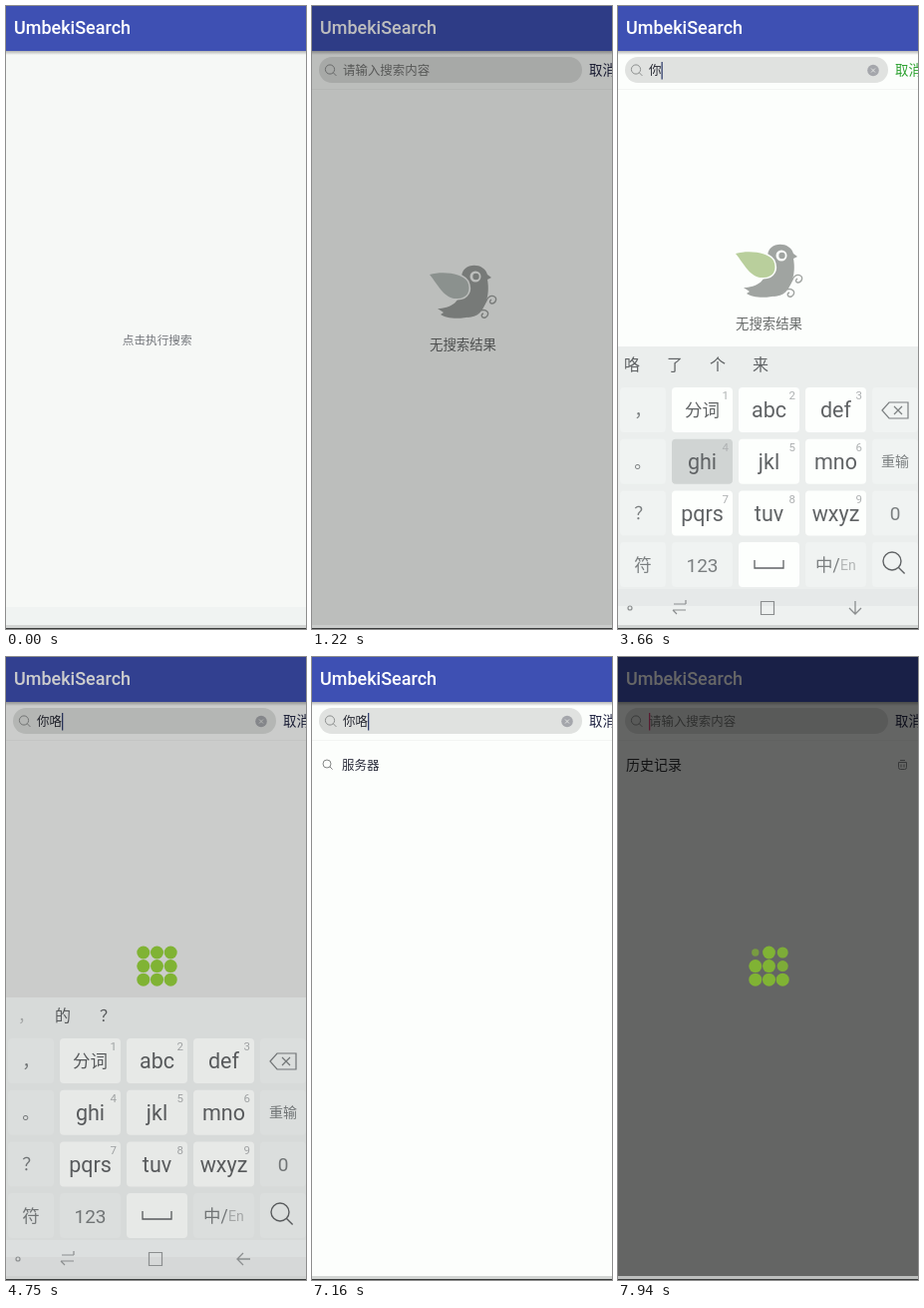
Animation, 301 px wide and 624 px high, one loop 8 s. Source, as an HTML page with a canvas:

```html
<!DOCTYPE html>
<html lang="zh-CN">
<head>
<meta charset="utf-8">
<style>
  html, body { margin: 0; width: 100%; height: 100%; overflow: hidden; background: #fcfefc; }
  canvas { display: block; }
</style>
</head>
<body>
<canvas id="stage" width="301" height="624"></canvas>
<script>
const c = document.getElementById('stage').getContext('2d');
const LOOP = 8000;

// The screen refreshes in bursts: [first, last, count] in ms.
const bursts = [
  [0, 0, 1], [210, 1010, 11], [1220, 1220, 1], [1350, 1450, 2], [1910, 1910, 1], [2370, 2370, 1],
  [2520, 2720, 3], [2790, 3300, 7], [3390, 3490, 2], [3660, 4050, 6], [4410, 4580, 3], [4750, 4750, 1],
  [4860, 5150, 4], [5360, 5360, 1], [5500, 5530, 2], [5670, 5750, 2], [6020, 6380, 6], [6680, 6760, 2],
  [7160, 7160, 1], [7390, 7800, 6], [7940, 7940, 1]
];
const ticks = bursts.flatMap(([a, b, n]) =>
  Array.from({ length: n }, (_, i) => n > 1 ? a + (b - a) * i / (n - 1) : a));

function track(t, ...points) {
  if (t <= points[0][0]) return points[0][1];
  for (let i = 1; i < points.length; i++) {
    const [a, u] = points[i - 1], [b, v] = points[i];
    if (t <= b) return u + (v - u) * (t - a) / (b - a);
  }
  return points[points.length - 1][1];
}
const within = (t, a, b) => t >= a && t < b;

function rect(x, y, w, h, color, r = 0) {
  c.fillStyle = color;
  c.beginPath();
  c.roundRect(x, y, w, h, r);
  c.fill();
}
function disc(x, y, r, color) {
  c.fillStyle = color;
  c.beginPath();
  c.arc(x, y, r, 0, 7);
  c.fill();
}
function line(d, color, width = 1) {
  c.strokeStyle = color;
  c.lineWidth = width;
  c.stroke(new Path2D(d));
}
function fill(d, color) {
  c.fillStyle = color;
  c.fill(new Path2D(d));
}
// y is the optical middle of the line
function text(s, x, y, size, color, weight = 400, align = 'left') {
  c.font = `${weight} ${size}px Roboto, "Noto Sans CJK SC", "Noto Sans CJK", sans-serif`;
  c.textAlign = align;
  c.fillStyle = color;
  c.fillText(s, x, y + size * .37);
}
function group(x, y, alpha, draw) {
  c.save();
  c.translate(x, y);
  c.globalAlpha *= alpha;
  draw();
  c.restore();
}
function magnifier(x, y, r, color, width = 1) {
  const k = r * .7;
  line(`M${x + r} ${y}A${r} ${r} 0 1 1 ${x - r} ${y}A${r} ${r} 0 1 1 ${x + r} ${y}M${x + k} ${y + k}l${k} ${k}`, color, width);
}

function header() {
  const shadow = c.createLinearGradient(0, 45, 0, 49);
  shadow.addColorStop(0, 'rgba(0,0,0,.28)');
  shadow.addColorStop(1, 'rgba(0,0,0,0)');
  rect(0, 45, 301, 4, shadow);
  rect(0, 0, 301, 45, '#3e50b3');
  text('UmbekiSearch', 8, 21.3, 18, '#fff', 500);
}

function bird(x, y, wing) {
  group(x, y, 1, () => {
    const grey = '#a0a4a1';
    fill('M32 13C31-4 55-4 58 9L62 12L58 14C61 30 56 46 42 51C30 54 16 53 11 49L14 47L8 43C20 43 34 38 32 13', grey);
    line('M38 51C52 51 53 41 57 35C61 27 69 31 66 36C63 40 58 37 62 34M49 46C57 42 62 48 56 52C52 53 51 49 54 48', grey, 1.4);
    const leaf = 'M0 9C14 5 33 8 38 16C42 25 38 33 28 33C15 34 9 20 0 9';
    line(leaf, '#fcfefc', 3);
    fill(leaf, wing);
    disc(46, 11, 5.5, '#fcfefc');
    disc(46.5, 11, 3.2, grey);
  });
}

function searchPage(t) {
  rect(0, 45, 301, 579, '#fcfefc');
  rect(0, 83, 301, 1, '#f3f5f3');
  rect(7, 51, 264, 26, '#e0e2e0', 13);
  magnifier(18, 63.5, 4.6, '#8d908f');
  const typed = t < 3660 || t >= 7390 ? '' : t < 4410 ? '你' : '你咯';
  text(typed || '请输入搜索内容', 31, 64.5, 12.45, typed ? '#23252f' : '#747674');
  if (typed) {
    disc(256, 64.5, 5.8, '#a4a6ab');
    line('M254 62.5l4 4m0-4l-4 4', '#e0e2e0');
  }
  const caretOn = within(t, 1910, 2370) || within(t, 3390, 6680) || t >= 7160;
  if (caretOn) rect(31 + typed.length * 12.5, 56, 1.3, 17.5, typed ? '#33406f' : '#e0457c');
  text('取消', 278, 64.5, 13.4, within(t, 1910, 4580) ? '#2aa02e' : '#1d2140', 500);

  if (t < 1220 || t >= 7390) {
    text('历史记录', 8, 108, 14, '#2c2e30', 500);
    line('M281.5 105.5h8v5q0 2-2 2h-4q-2 0-2-2zM283 103.5h5M284 107.5v3M287 107.5v3', '#8b8d8e');
  } else if (t < 4410) {
    const y = t < 2370 ? 260 : 239;
    bird(118, y, t < 1910 ? '#bac3be' : '#b9cf9c');
    text('无搜索结果', 151.5, y + 79, 13.4, '#666968', 400, 'center');
  } else if (t >= 6020) {
    magnifier(15, 107, 4, '#858887');
    text('服务器', 30, 108.5, 12.5, '#2b2d3c');
  }
}

const keys = [
  ['，', '分词', 'abc', 'def', ''],
  ['。', 'ghi', 'jkl', 'mno', '重输'],
  ['？', 'pqrs', 'tuv', 'wxyz', '0'],
  ['符', '123', '', '', '']
];
const columns = [[2, 46], [54, 61], [121, 61], [188, 61], [255, 46]];
const presses = [[3390, 3490, 8], [3660, 3740, 6], [3810, 3890, 7], [3960, 4050, 8], [4410, 4580, 19]];

function candidates(t) {
  const y = 359, ink = '#5f6264';
  if (t < 3390) {
    text('+', 15, y, 16, ink, 400, 'center');
    line(`M66 ${y}a8 8 0 1 1-16 0a8 8 0 1 1 16 0M54 ${y + 2}q4 4 8 0M55 ${y - 3}v1M61 ${y - 3}v1`
      + `M100 ${y - 6}h17v12h-17zM103 ${y - 2}h11M103 ${y + 2}h11`
      + `M152 ${y - 5}h9v7h-9zM158 ${y - 1}h10v7h-10z`
      + `M207 ${y - 7}h6v9h-6zM204 ${y}q0 5 6 5t6-5M210 ${y + 5}v3`
      + `M253 ${y - 6}h15v13h-15zM264 ${y}a3 3 0 1 1-6 0a3 3 0 1 1 6 0`, ink, 1.3);
  } else if (t < 4410) {
    [...(t < 3660 ? '你哦那们' : '咯了个来')].forEach((s, i) => text(s, 14 + i * 43, y, 16, ink, 400, 'center'));
  } else {
    text('，', 12, y, 16, '#b2b5b5');
    text('的', 57, y, 16, ink, 400, 'center');
    text('？', 102, y, 16, ink, 400, 'center');
  }
}

function keyboard(t) {
  rect(0, 341, 301, 260, '#ebeeed');
  candidates(t);
  const ink = '#606365', soft = '#7b7f80';
  keys.forEach((row, r) => row.forEach((label, k) => {
    const [x, w] = columns[k], y = 382 + r * 51.7, mid = x + w / 2;
    const light = k > 0 && k < 4 && (r < 3 || k === 2);
    const down = presses.some(([a, b, id]) => id === r * 5 + k && within(t, a, b));
    rect(x, y, w, 45, down ? '#d0d4d3' : light ? '#fdfffd' : '#f0f3f2', 4);
    const size = label === '重输' ? 14 : /^[a-z]/.test(label) ? 21.5 : /\d/.test(label) ? 19 : 17.5;
    text(label, mid, y + 22.5, size, light ? ink : soft, 400, 'center');
    if (light && r < 3) text(r * 3 + k, x + w - 4, y + 8, 11.5, '#aeb1b2', 400, 'right');
  }));
  line('M265 405l7-8h19v16h-19zM277 401l8 8m0-8l-8 8', soft, 1.2);
  line('M137 555v8h29v-8', ink, 1.3);
  text('中/', 198, 560, 17.5, soft);
  text('En', 223, 560, 14, '#b3b6b6');
  magnifier(275, 556, 9, ink, 1.4);
}

function navBar(t) {
  const ink = '#8b8e8f';
  rect(0, 584, 301, 40, 'rgba(226,230,229,.5)');
  line('M14 603a2 2 0 1 1-4 0a2 2 0 1 1 4 0M56 599h12M55 605h13m-13 0l4 4M68 599v-4M143.500 596.500h13v13h-13z', ink, 1.2);
  line(t < 4580 ? 'M238 596v13m-6-6l6 6l6-6' : 'M245 603h-13m6-6l-6 6l6 6', ink, 1.3);
}

// Nine balls pulsing at their own rates
const periods = [720, 1020, 1280, 1420, 1450, 1180, 870, 1450, 1060];
const delays = [0, 250, 0, 480, 310, 30, 460, 780, 450];
function loader(age) {
  periods.forEach((period, i) => {
    const phase = Math.max(0, age - delays[i]) % period / period;
    const p = .5 - Math.cos(phase * Math.PI) / 2;
    const scale = 1 - Math.min(p, 1 - p);
    const alpha = track(p, [0, 1], [1 / 3, .82], [2 / 3, .48], [1, 1]);
    group(137.8 + i % 3 * 13.7, 296 + Math.floor(i / 3) * 13.6, alpha, () => disc(0, 0, 6.5 * scale, '#80b334'));
  });
}

function draw(t) {
  c.clearRect(0, 0, 301, 624);
  rect(0, 0, 301, 624, '#f6f8f6');
  rect(0, 602, 301, 22, '#f0f3f2');
  if (t < 210) text('点击执行搜索', 151.7, 335, 11.65, '#74777c', 400, 'center');
  else group(0, 0, track(t, [130, 0], [370, 1]), () => searchPage(t));
  header();

  const dim = track(t, [370, 0], [610, .6], [1010, .6], [1220, .255], [1350, .1], [1450, 0],
    [4580, 0], [4750, .195], [4860, .35], [5050, .6], [5990, .6], [6090, .28], [6310, 0],
    [7470, 0], [7720, .6]);
  rect(0, 0, 301, 624, `rgba(0,0,0,${dim})`);
  if (within(t, 5360, 6020)) fill('M119 25h3v2h2v5h-2v-3h-3z', '#c8cac8');

  if (within(t, 2520, 5150)) {
    const shown = track(t, [2520, 0], [2720, .09], [3040, 1], [4750, 1], [5100, 0]);
    const slide = track(t, [2520, 70], [2720, 51], [3040, 0], [4750, 0], [5100, 60]);
    group(0, slide, shown, () => {
      keyboard(t);
      rect(0, 341, 301, 260, `rgba(0,0,0,${dim * .45})`);
    });
    const rise = track(t, [2520, 30], [2720, 12], [2900, 0], [4860, 0], [5100, 36]);
    group(0, rise, 1, () => navBar(t));
  }

  if (within(t, 450, 1220)) loader(t - 450);
  if (within(t, 4750, 6020)) loader(t < 4850 ? 0 : t - 4560);
  if (t >= 7610) loader(t - 7610);

  rect(0, 620, 301, 3, 'rgba(205,207,206,.85)');
  rect(0, 623, 301, 1, '#3a3c3c');
}

function play(now) {
  const t = now % LOOP;
  draw(ticks.findLast(tick => tick <= t));
  requestAnimationFrame(play);
}
requestAnimationFrame(play);
</script>
</body>
</html>
```
